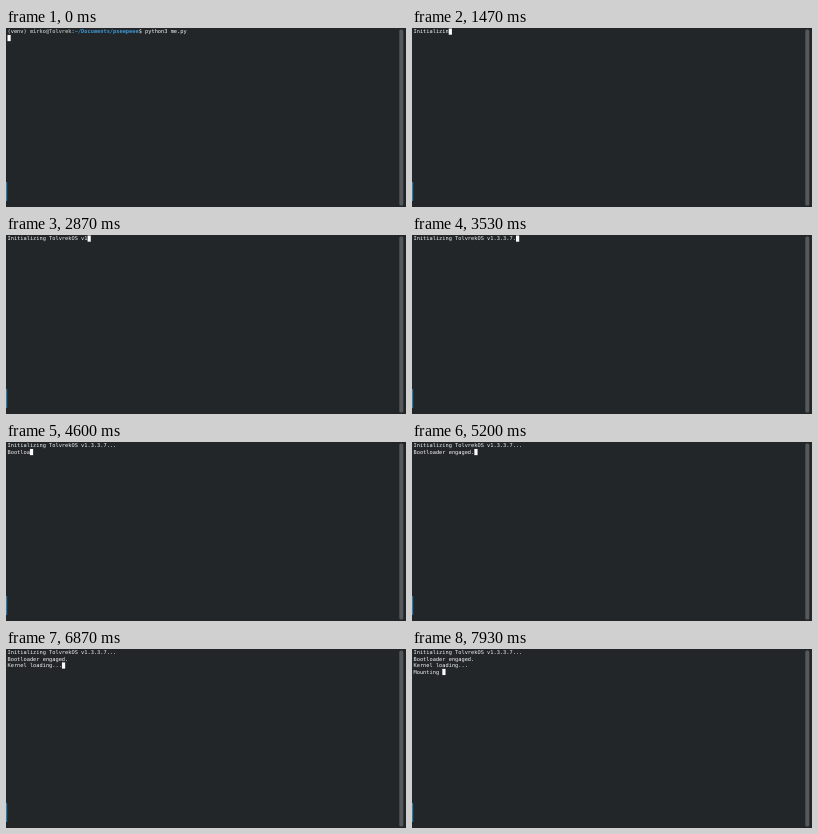
An HTML page for the animation above (8 s loop, 400 by 179 pixels).

```html
<!DOCTYPE html>
<html lang="en">
<head>
<meta charset="utf-8">
<title>Terminal boot</title>
<style>
  html, body { margin: 0; height: 100%; overflow: hidden; background: #222628; }
  svg { display: block; width: 100vw; height: 100vh; }
  text {
    font: 5.32px "DejaVu Sans Mono", monospace;
    fill: #f4f4f4;
    white-space: pre;
    text-rendering: geometricPrecision;
  }
  .user { fill: #a3a8a8; font-weight: bold; }
  .path { fill: #3f97d3; font-weight: bold; }
</style>
</head>
<body>
<svg viewBox="0 0 400 179">
  <rect width="400" height="179" fill="#222628"/>
  <rect y="154" width="1.2" height="19" fill="#2d76a8"/>
  <rect x="393.3" y="1.5" width="4" height="176" rx="1.5" fill="#55595b"/>
  <text id="prompt" x="1.5" y="5.4">(venv) <tspan class="user">mirko@Tolvrek</tspan>:<tspan class="path">~/Documents/pseepeee</tspan>$ python3 me.py</text>
  <g id="screen"></g>
  <rect id="cursor" width="3.2" height="6.2" fill="#fcfcfc"/>
</svg>
<script>
const LOOP = 8000, LEFT = 1.5, CHAR = 3.203, ROW = 6.45;
const lines = ["Initializing TolvrekOS v1.3.3.7...", "Bootloader engaged.", "Kernel loading...", "Mounting "];
const $ = id => document.getElementById(id);

const rows = lines.map((_, i) => {
  const row = document.createElementNS("http://www.w3.org/2000/svg", "text");
  row.setAttribute("x", LEFT);
  row.setAttribute("y", 5.4 + i * ROW);
  return $("screen").appendChild(row);
});

// Each step: the time it shows, the current line, and the characters typed on it.
const steps = [];
const add = (tick, line, count) =>
  steps.push({ time: Math.round(tick * 20 / 3) * 10, line, count });
const run = (tick, line, from, to) => {
  for (let n = from; n <= to; n++) add(tick + n - from, line, n);
};

add(8, 0, 2);
for (let n = 0; n < 32; n++) add(10 + 3 * (n >> 1) + n % 2, 0, n + 3);
add(58, 1, 0);
add(60, 1, 1);
for (let k = 0; k < 14; k++) add(65 + k, 1, Math.floor(2 + k * 4 / 3));
add(79, 2, 1);
run(85, 2, 2, 3);
run(88, 2, 4, 8);
run(94, 2, 9, 13);
run(100, 2, 14, 17);
add(104, 3, 0);
add(106, 3, 1);
for (let k = 0; k < 6; k++) add(114 + k, 3, Math.floor(2.4 + k * 4 / 3));

const waiting = { line: 1, count: 0 };

function draw(t) {
  const step = steps.findLast(s => s.time <= t);
  const { line, count } = step || waiting;
  $("prompt").style.display = step ? "none" : "";
  rows.forEach((row, i) => {
    row.textContent = !step || i > line ? "" : i < line ? lines[i] : lines[i].slice(0, count);
  });
  $("cursor").setAttribute("x", LEFT + count * CHAR);
  $("cursor").setAttribute("y", 0.5 + line * ROW);
}

function frame() {
  draw(performance.now() % LOOP);
  requestAnimationFrame(frame);
}
frame();
</script>
</body>
</html>
```
